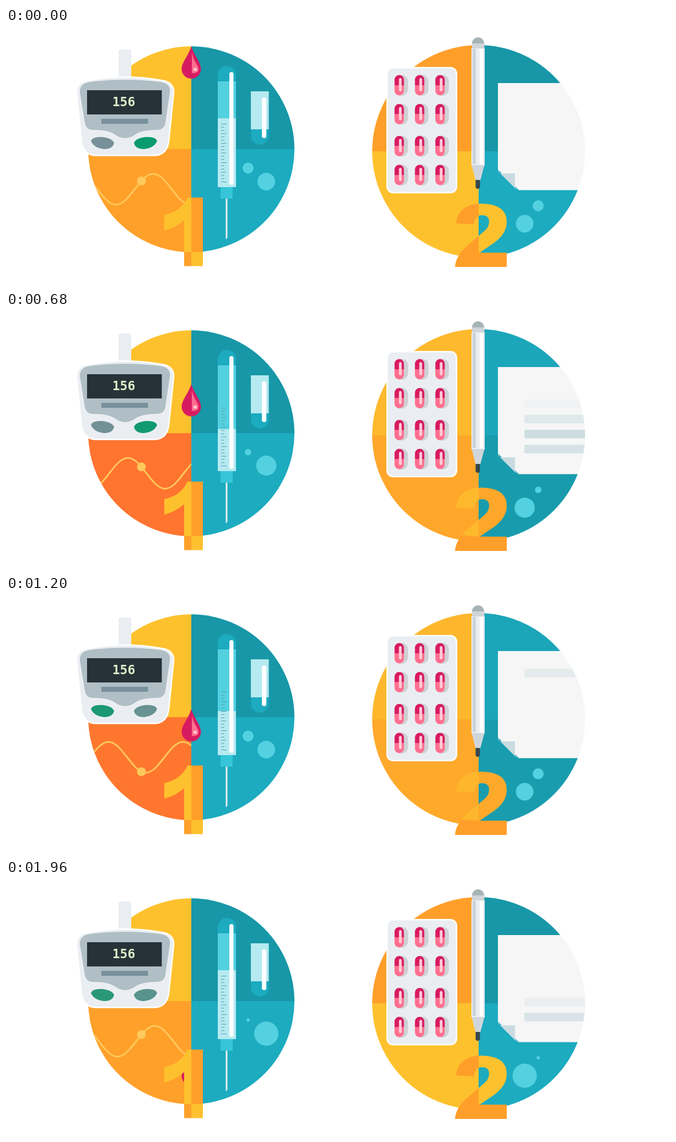
An HTML page that plays this animation: 1204 by 465 pixels, repeating every 2000 ms.

```html
<!DOCTYPE html>
<html lang="en">
<head>
<meta charset="utf-8">
<title>Health kit</title>
<style>
  html, body { margin: 0; width: 100%; height: 100%; overflow: hidden; background: #fff; }
  svg { display: block; width: 1204px; height: 465px; }

  .yellow { fill: #fec12e; }
  .orange { fill: #ff9f2a; }
  .deep { fill: #1797a7; }
  .teal { fill: #1dabc0; }
  .aqua { fill: #53d1e0; }
  .ice { fill: #b6eaf1; }
  .shell { fill: #eaeef2; stroke: #fff; stroke-width: 2.5; }
  .shine { fill: #fff; }

  /* Slow colour swing: out until 890 ms, back by 1960 ms */
  .heat, .to-yellow, .to-orange, .to-teal, .to-deep, .level { animation: 2s linear infinite; }
  .heat { animation-name: heat; }
  .to-yellow { animation-name: toYellow; }
  .to-orange { animation-name: toOrange; }
  .to-teal { animation-name: toTeal; }
  .to-deep { animation-name: toDeep; }
  .level { animation-name: level; }
  @keyframes heat { 0%, 98%, 100% { fill: #ffa02a } 44.5% { fill: #ff6630 } }
  @keyframes toYellow { 0%, 98%, 100% { fill: #ff9f2a } 44.5% { fill: #fec12e } }
  @keyframes toOrange { 0%, 98%, 100% { fill: #fec12e } 44.5% { fill: #ff9f2a } }
  @keyframes toTeal { 0%, 98%, 100% { fill: #1797a7 } 44.5% { fill: #1dabc0 } }
  @keyframes toDeep { 0%, 98%, 100% { fill: #1dabc0 } 44.5% { fill: #1797a7 } }
  @keyframes level { 0%, 98%, 100% { height: 67px } 44.5% { height: 130.5px } }

  .drop { animation: fall 2s linear infinite; }
  @keyframes fall { to { transform: translateY(287px) } }

  .wave { fill: none; stroke: #ffc95c; stroke-width: 3; animation: scroll 2s linear infinite; }
  @keyframes scroll { to { transform: translateX(-135px) } }
  .dot { fill: #ffc95c; animation: bob 1s cubic-bezier(.364, 0, .636, 1) -1682ms infinite alternate; }
  @keyframes bob { to { transform: translateY(56px) } }

  .bubble-a { animation: bubbleA 2s linear infinite; }
  .bubble-b { animation: bubbleB 2s linear infinite; }
  @keyframes bubbleA {
    0%, 60% { r: 10px } 18%, 78% { r: 17.5px } 38%, 98% { r: 3px } 100% { r: 3.6px }
  }
  @keyframes bubbleB {
    0%, 60% { r: 16px } 18%, 78% { r: 3px } 38%, 98% { r: 22px } 100% { r: 21.5px }
  }

  .key-left { animation: keyLeft 2s cubic-bezier(.364, 0, .636, 1) infinite; }
  .key-right { animation: keyRight 2s cubic-bezier(.364, 0, .636, 1) infinite; }
  @keyframes keyLeft {
    0%, 37%, 74% { fill: #78909a } 18.5%, 55.5%, 92.5% { fill: #0a9b6c } 100% { fill: #309779 }
  }
  @keyframes keyRight {
    0%, 37%, 74% { fill: #0a9b6c } 18.5%, 55.5%, 92.5% { fill: #78909a } 100% { fill: #52948a }
  }

  .reading { font: bold 23px "DejaVu Sans Mono", monospace; fill: #dcedc8; text-anchor: middle; }
  .steady { animation: steady 2s step-end infinite; }
  .dip { animation: dip 2s step-end infinite; }
  @keyframes steady { 0%, 20% { opacity: 1 } 10% { opacity: 0 } }
  @keyframes dip { 0%, 20% { opacity: 0 } 10% { opacity: 1 } }

  .row { fill: #c8d9df; opacity: 0; animation: write 2s linear calc(var(--i) * 120ms) infinite; }
  @keyframes write {
    0%, 1.5%, 30.25%, 55.6%, 84.35%, 100% { opacity: 0 }
    14%, 68.1% { opacity: 1 }
  }
  /* Hides the late rows' tails when the loop restarts */
  .late { animation: late 2s step-end infinite; }
  @keyframes late { 0% { opacity: 0 } 10% { opacity: 1 } }
</style>
</head>
<body>
<svg viewBox="0 0 1204 465">
  <defs>
    <clipPath id="disc1"><circle cx="336" cy="220.3" r="187"/></clipPath>
    <clipPath id="disc2"><circle cx="857" cy="224" r="193"/></clipPath>
    <clipPath id="quarter"><path d="M140 220H336V410H140Z"/></clipPath>
    <clipPath id="one"><path d="M329 308H357V432.500H323V349Q307 363 287 368V340Q318 333 329 308Z"/></clipPath>
    <clipPath id="two"><path d="M816 355Q820 319 863 319Q908 320 908 352Q908 374 884 391L859 408H908V434H814Q816 412 838 394L866 370Q876 362 876 352Q876 340 863 340Q851 340 848 357Z"/></clipPath>
    <path id="key" d="M154 205Q157 197 174 198Q193 200 196 209Q193 220 178 220Q159 218 154 205Z"/>
    <g id="pill">
      <rect x="-8" y="-19" width="24" height="38" rx="12" fill="#cfd1d4"/>
      <path d="M-8.500 0V-10a8.500 8.500 0 0 1 17 0V0Z" fill="#d81b60"/>
      <path d="M-8.500 0V10a8.500 8.500 0 0 0 17 0V0Z" fill="#ff6f8f"/>
      <rect x="-.5" y="-13" width="5" height="24" rx="2.500" fill="#ffcbd8"/>
    </g>
    <g id="pillRow">
      <use href="#pill" x="713"/><use href="#pill" x="750"/><use href="#pill" x="787"/>
    </g>
  </defs>

  <g clip-path="url(#disc1)">
    <path class="yellow" d="M149 33H336V220H149Z"/>
    <path class="deep" d="M336 33H524V220H336Z"/>
    <path class="heat" d="M149 220H336V408H149Z"/>
    <path class="teal" d="M336 220H524V408H336Z"/>
    <g clip-path="url(#quarter)">
      <path class="wave" d="M132 265c24.600 0 42.900 56 67.500 56s42.900-56 67.500-56s42.900 56 67.500 56s42.900-56 67.500-56s42.900 56 67.500 56"/>
    </g>
  </g>
  <circle class="dot" cx="245.500" cy="265" r="8"/>

  <!-- Syringe -->
  <path class="teal" d="M384 97V85a16.500 16 0 0 1 33 0V97Z"/>
  <rect class="ice" x="384" y="97" width="33" height="192"/>
  <rect class="aqua level" x="384" y="97" width="33" height="67"/>
  <path d="M395 174V280" stroke="#5f9ba5" stroke-width="10" stroke-dasharray="1 16.500"/>
  <path d="M393 179.830V280" stroke="#5f9ba5" stroke-width="6" stroke-dasharray="1 4.830 1 10.670"/>
  <rect class="shine" x="405" y="80" width="7.500" height="205" rx="3.750"/>
  <rect x="389" y="289" width="22" height="21" fill="#36c5d8"/>
  <path d="M398.500 310H401.500V381L398.500 384Z" fill="#eceff1"/>

  <!-- Vial -->
  <rect class="ice" x="444" y="115" width="32.500" height="69"/>
  <path class="teal" d="M444 184V195.500a16.200 16.200 0 0 0 32.500 0V184Z"/>
  <rect class="shine" x="464" y="126" width="8" height="74" rx="4"/>

  <circle class="aqua bubble-a" cx="439" cy="254.500" r="10"/>
  <circle class="aqua bubble-b" cx="472" cy="279" r="16"/>

  <g class="drop">
    <path d="M336 33C341 50 353.500 62 353.500 74.500A17.500 17.300 0 0 1 318.500 74.500C318.500 62 331 50 336 33Z" fill="#d81b60"/>
    <path d="M337 44Q339 55 346 66Q351 74 348 79Q345 82 337 82Z" fill="#ff6f8f"/>
    <circle cx="343" cy="75" r="3" fill="#ffcbd8"/>
  </g>

  <g clip-path="url(#one)">
    <path class="yellow" d="M280 300H336V407H280ZM336 407H360V440H336Z"/>
    <path class="orange" d="M336 300H360V407H336ZM280 407H336V440H280Z"/>
  </g>

  <!-- Meter -->
  <path d="M204 92V43q0-4 4-4h15q4 0 4 4V92Z" fill="#eaeef2"/>
  <path class="shell" d="M150 95Q216 83 282 95Q305 98 304 118L295 207Q291 231.500 268 231.500H164Q141 231.500 137 207L128 118Q127 98 150 95Z"/>
  <path d="M152 98Q216 90 280 98Q299 101 297 117L289 172Q287 185 274 185Q247 185 235 193Q226 200 216 200Q206 200 197 193Q185 185 158 185Q145 185 143 172L134 117Q133 101 152 98Z" fill="#b0bec5"/>
  <rect x="147" y="113" width="135.500" height="44" fill="#263238"/>
  <text class="reading steady" x="213.500" y="142">156</text>
  <text class="reading dip" x="213.500" y="142">155</text>
  <rect x="173" y="165" width="84.500" height="9" fill="#78909c"/>
  <use class="key-left" href="#key"/>
  <use class="key-right" href="#key" transform="translate(428) scale(-1 1)"/>

  <g clip-path="url(#disc2)">
    <path class="to-yellow" d="M664 31H857V224H664Z"/>
    <path class="to-teal" d="M857 31H1050V224H857Z"/>
    <path class="to-orange" d="M664 224H857V417H664Z"/>
    <path class="to-deep" d="M857 224H1050V417H857Z"/>
    <!-- Paper -->
    <path d="M892 100H1060V294.500H930L892 257Z" fill="#f6f6f6"/>
    <path d="M892 257Q892 264 899 264H923V287Q924 294 931 294.500Q926 294 922 290L896 264Z" fill="#c9dbe1"/>
    <path class="to-deep" d="M891 257Q892 262 896 265L922 291Q926 295 931 295H891Z"/>
    <rect class="row" style="--i:0" x="940" y="132" width="120" height="15.500"/>
    <rect class="row" style="--i:1" x="940" y="159.300" width="120" height="15.500"/>
    <rect class="row" style="--i:2" x="940" y="186.700" width="120" height="15.500"/>
    <g class="late">
      <rect class="row" style="--i:3" x="940" y="214" width="120" height="15.500"/>
      <rect class="row" style="--i:4" x="940" y="241.300" width="120" height="15.500"/>
    </g>
  </g>

  <circle class="aqua bubble-a" cx="965" cy="323" r="10"/>
  <circle class="aqua bubble-b" cx="940.500" cy="355.500" r="16"/>

  <!-- Pills -->
  <rect class="shell" x="691" y="72" width="126" height="227" rx="11"/>
  <use href="#pillRow" y="104"/>
  <use href="#pillRow" y="156.500"/>
  <use href="#pillRow" y="214.500"/>
  <use href="#pillRow" y="267"/>

  <!-- Pencil -->
  <path d="M845 30V28a11 11 0 0 1 22 0V30Z" fill="#a6b4b6"/>
  <path d="M845 28H867.500V38H845Z" fill="#cfd5d9"/>
  <path d="M844 37H868V250H844Z" fill="#eaeef2"/>
  <path d="M846 38H852V247H846Z" fill="#cbd3d8"/>
  <path d="M859 38H865V248H859Z" fill="#fff"/>
  <path d="M844.500 249H867.500L860 277H851.500Z" fill="#cfd6db"/>
  <path d="M851.500 276H859.500V288a4 4 0 0 1-8 0Z" fill="#37474f"/>

  <g clip-path="url(#two)">
    <path class="to-yellow" d="M810 310H857V410H810Z"/>
    <path class="to-orange" d="M857 310H912V410H857Z"/>
    <path class="orange" d="M810 404L858 408H912V440H810Z"/>
  </g>
</svg>
</body>
</html>
```
